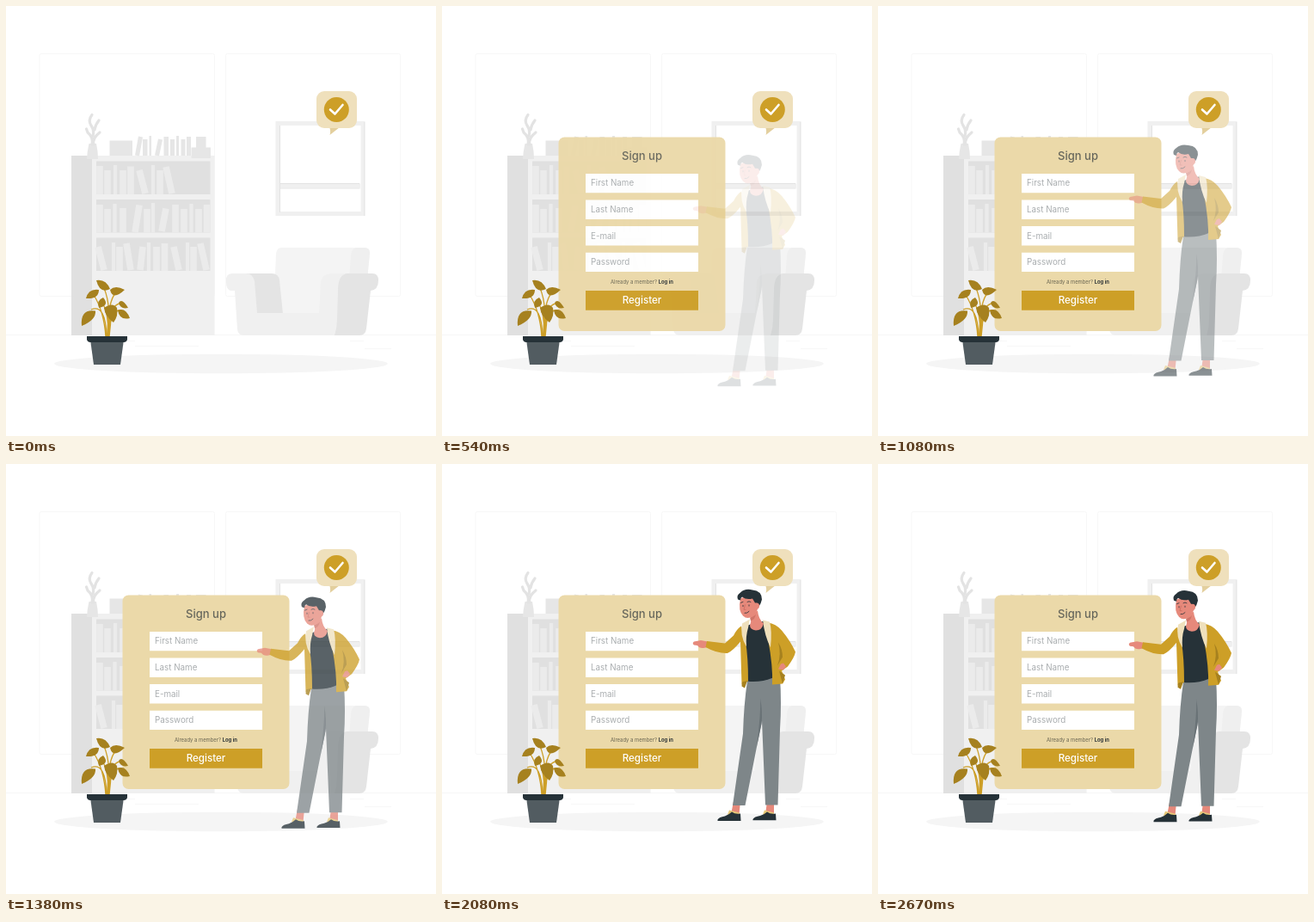
An HTML page for the animation above (2.71 s loop, 500 px wide and 500 px high).

```html
<!DOCTYPE html>
<html lang="en">
<head>
<meta charset="utf-8">
<title>Sign up</title>
<style>
  html, body { margin: 0; width: 100%; height: 100%; overflow: hidden; background: #fff; }
  svg { display: block; width: 100vw; height: 100vh; }
  text { font-family: Inter, "DejaVu Sans", sans-serif; }
  .label { font-size: 9.8px; fill: #a9adaf; }
  .wide { stroke-width: 7.6; }
  .thin { stroke-width: 4.2; }
</style>
</head>
<body>
<svg viewBox="0 0 500 500">
  <!-- room -->
  <g fill="none" stroke="#f7f7f7">
    <rect x="39" y="55.5" width="203.500" height="282" rx="2"/>
    <rect x="255.500" y="55.500" width="203" height="282" rx="2"/>
    <path d="M0 382.500H500M400 389.500H416M417 398.500H448M100 389.500H150M150 395.500H224"/>
  </g>

  <!-- bookcase -->
  <path fill="#e0e0e0" d="M76 174H101V383H76Z"/>
  <path fill="#f0f0f0" d="M100 174H242.500V383H100Z"/>
  <path fill="#e0e0e0" d="M105 180.500H237.500V219H105ZM105 225H237.500V263.500H105ZM105 269.500H237.500V308H105Z"/>
  <g fill="none" stroke="#ebebeb">
    <path class="wide" d="M109 186V219M118 191V219M136 191V219M145 186.500V219M155 191L162 218M179 191V219M186 187L193 218
      M109 231V263.500M118 236V263.500M136 235V263.500M155 231.500L150 263M164 236V263.500M186 235.500L181 262M197 231V263.500M207 236V263.500M224 236V263.500M233.500 231V263.500
      M107 280L114 307M132 280V308M140 276L145 307M159 280L156 307M175 280V308M184.500 276V308M195 280L201 307M218 280V308M226 276L233 307"/>
    <path class="thin" d="M127 185V219M171 185V219M126.500 230V263.500M171 229V263.500M215.500 230V263.500M125 275V308M166 275V308M211 275V308"/>
  </g>
  <g fill="#e6e6e6">
    <path d="M120.500 156.500H147V174H120.500ZM154 151.500L159 152.500L155 174.500L150 173.500ZM159 155H164.500V174H159ZM166.500 151H169V174H166.500ZM177 154.500L182 155.500L178 174.500L173 173.500Z"/>
    <path d="M183.500 152H189V174H183.500ZM191 155H196V174H191ZM198 151H201V174H198ZM203.500 155H208.500V174H203.500ZM210 152H215V174H210ZM215.500 164.500H238V177H215.500ZM221 152H232.500V165H221Z"/>
    <path d="M96.500 160H105Q107 169 107 178H94Q94.500 168 96.500 160Z"/>
  </g>
  <path fill="none" stroke="#e3e3e3" stroke-width="3.200" stroke-linecap="round"
    d="M100 161Q102 153 95 147L93.500 143M102 161Q100 154 109 147M101 151Q103 145 99 139T100 126.500M103 144Q104 138 108 133"/>

  <!-- window -->
  <rect x="316" y="136.500" width="99" height="105" fill="none" stroke="#f0f0f0" stroke-width="5"/>
  <path d="M318 209H412" stroke="#f0f0f0" stroke-width="5"/>
  <path d="M318.500 212H411.500M318.500 139V240M416.800 135V244M318 206.500H411" fill="none" stroke="#e3e3e3"/>

  <!-- armchair -->
  <path fill="#f4f4f4" d="M320 281H416Q423 281 423 287L416 360H311L314 288Q315 281 320 281Z"/>
  <path fill="#efefef" d="M408 281H417Q423 281 423 287L416 360H396L401 290Q402 281 408 281Z"/>
  <path fill="#e4e4e4" d="M276 311H309Q317 311 318 319L322 358H284L276 330Z"/>
  <path fill="#f0f0f0" d="M263 311H279Q287 311 289 320L292 357H364L366 322Q367 311 380 311H402L388 383H276Q270 383 269 376L266 331H261Q256 329 256 321Q255 311 263 311Z"/>
  <path fill="#e4e4e4" d="M397 311H426Q433 311 433 319Q433 330 424 331L419 375Q418 383 411 383H382Q385 374 385 364L386 331Q386 312 397 311Z"/>

  <ellipse cx="250" cy="416" rx="194" ry="11.300" fill="#f5f5f5"/>

  <!-- form -->
  <g id="form" opacity="0">
    <rect x="135.500" y="152.500" width="194" height="225.500" rx="7" fill="#ebd9a9"/>
    <text x="232.500" y="179" font-size="13" font-weight="500" text-anchor="middle" fill="#67675c">Sign up</text>
    <path fill="#fff" d="M167 195H298V217.300H167ZM167 225.500H298V248H167ZM167 256H298V278.500H167ZM167 286.700H298V309H167Z"/>
    <g class="label">
      <text x="173" y="209.300">First Name</text>
      <text x="173" y="240">Last Name</text>
      <text x="173" y="270.500">E-mail</text>
      <text x="173" y="301">Password</text>
    </g>
    <text x="232.500" y="323" font-size="5.900" text-anchor="middle" fill="#696551">Already a member? <tspan font-weight="700" fill="#303638">Log in</tspan></text>
    <path fill="#cd9f27" d="M167 331H298V353.700H167Z"/>
    <text x="232.500" y="345.800" font-size="11.600" font-weight="500" text-anchor="middle" fill="#fff">Register</text>
  </g>

  <!-- speech bubble -->
  <path fill="#e3cf9d" d="M376 141H388L376.500 150Q378 145 376 141Z"/>
  <rect x="361" y="99" width="47" height="43" rx="9" fill="#efe0bc"/>
  <circle cx="384.300" cy="120.500" r="14.500" fill="#cd9f27"/>
  <path d="M377 120.500L382.500 125.500L391.500 115" fill="none" stroke="#fff" stroke-width="2.600" stroke-linecap="round" stroke-linejoin="round"/>

  <!-- man -->
  <g id="man" opacity="0">
    <path fill="#e6897b" d="M339 394H347L345.500 409H336ZM378 394H386V409H376Z"/>
    <path fill="#e6c878" d="M334 404L346 407L345 411L332 409ZM375 404L386 407V411L373 409Z"/>
    <path fill="#263238" d="M320.500 415Q322 412 329 411Q334 409 337 406Q341 409 347 408L347.500 416.500H320.500ZM361.500 414.500Q363 411.500 370 410.500Q375 409 378 406Q382 409 388 408L388.500 415.800H361.500Z"/>
    <path fill="#7e8689" d="M355 254L393 249Q395 280 393 310L390.500 398H376L372 300L352.500 398.500H338L350 315Q351 280 355 254Z"/>
    <path fill="#697276" d="M370 274Q373 288 371.500 304L366 330Q371 290 370 274Z"/>
    <path fill="#263238" d="M355 189L375 184L383 203L385 250Q370 256 354 254L350 215Z"/>

    <!-- raised arm and jacket -->
    <path fill="#e6897b" d="M309 208L301 206.500L293 208Q290.500 210 293 212L297 212.500Q299 216 304 215.500L309 214.500Z"/>
    <path fill="#cd9f27" d="M348 190Q343 193 339 201L329 210L308 207.500L306.500 214.500Q320 222 332 221.500Q338 219 347 208L348.500 258L356 254Q356 226 353 208Z"/>
    <path fill="#a6811f" d="M349 255L355 253.500L352 262L348.500 260Z"/>
    <path fill="#cd9f27" d="M379 186Q388 187 395 195Q405 207 411 220Q410 226 402 237L395 242L399 252L396 257L384 258Q385 237 379 205Z"/>
    <path fill="#a6811f" d="M391 209Q396 217 396 226L390 236Q395 223 391 209ZM392 242L399 247L396 257Z"/>
    <path fill="#e6897b" d="M397 233L394 234L391 240L397 241L400 237Z"/>
    <path fill="#efe0bc" d="M349 187L358 182L356 192Q353 201 354 214Q346 201 349 187ZM373 183L381 185Q384 195 382 215Q375 201 373 183Z"/>

    <!-- head -->
    <path fill="#e6897b" d="M359 177L367 172Q368 182 374 187Q372 195 365 195Q358 194 358 189Q360 184 359 177Z"/>
    <path fill="#cf7468" d="M358 180Q363 179 365 176Q364 182 359 184Z"/>
    <path fill="#e6897b" d="M347 158Q344 172 350 178Q355 183 362 178Q370 170 369 157L356 154Z"/>
    <path fill="#263238" d="M344 159Q342 154 347 151Q352 146 361 148Q372 149 372 159Q371 164 368 168Q368 163 364 163L361 158Q354 160 349 156Q347 157 347 160Z"/>
    <ellipse cx="366" cy="166.500" rx="3" ry="3.500" fill="#e6897b"/>
    <path fill="none" stroke="#263238" stroke-width=".8" stroke-linecap="round" d="M347.500 163L350 162M355 162Q357 160.500 359 162M350 166V167.200M357 165.500V166.700M352 175Q355 175.500 357 173"/>
    <path fill="none" stroke="#cb6b61" stroke-width=".8" d="M352.500 165L351 171H353.500"/>
  </g>

  <!-- plant -->
  <g fill="none" stroke="#cd9f27" stroke-width="1.300">
    <path d="M117 385Q116 346 99 353M116 385Q114 355 102 336M118 385Q123 350 114 328M118 385Q118 343 128 333M119 385Q119 352 111 345M119 385Q122 351 134 354M120 385Q119 347 133 346M120 385Q122 370 122 356"/>
  </g>
  <g fill="#a6811f">
    <path d="M105 319Q116 317 121 329Q109 335 105 319ZM93 340Q96 328 108 330Q108 341 93 340ZM138 330Q127 324 121 330Q124 343 138 330ZM131 345Q135 339 142 351Q133 353 131 345ZM108 351Q105 342 113 339Q121 348 108 351Z"/>
    <path d="M88 372Q86 352 104 354.500Q105 365 88 372ZM114 351Q124 344 129 351Q131 360 125 368Q115 361 114 351ZM130 354Q139 350 144 363Q132 366 130 354Z"/>
  </g>
  <path fill="#525c61" d="M98 388H137L133 417H102Z"/>
  <path fill="#263238" d="M94 384H141V388Q140 391 137 391H98Q95 391 94 388Z"/>
</svg>
<script>
  const LOOP = 2710, RISE = 30;
  const form = document.getElementById("form");
  const man = document.getElementById("man");

  const clamp = v => Math.min(1, Math.max(0, v));
  const bezier = (a, b, s) => 3 * (1 - s) ** 2 * s * a + 3 * (1 - s) * s * s * b + s ** 3;

  // Timing curve with a slight overshoot
  function overshoot(x) {
    let low = 0, high = 1;
    for (let i = 0; i < 24; i++) {
      const mid = (low + high) / 2;
      if (bezier(0.36, 0.5, mid) < x) low = mid; else high = mid;
    }
    return bezier(-0.01, 1.38, low);
  }

  const smooth = v => v * v * (3 - 2 * v);

  function draw() {
    const time = performance.now() % LOOP;
    const rise = overshoot(time / LOOP);
    form.setAttribute("opacity", smooth(clamp((time - 80) / 520)));
    man.setAttribute("opacity", clamp(rise));
    man.setAttribute("transform", `translate(0 ${RISE * (1 - rise)})`);
    requestAnimationFrame(draw);
  }
  draw();
</script>
</body>
</html>
```
